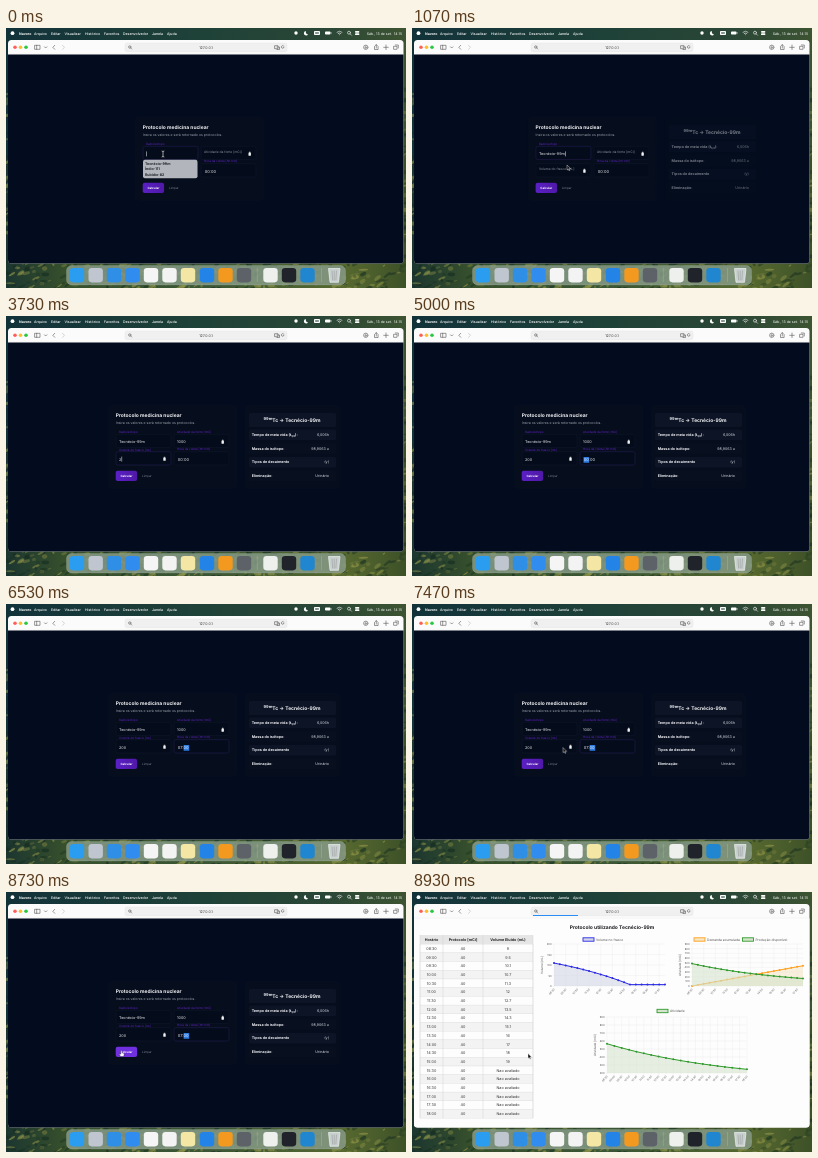
An HTML page that plays this animation: 400 by 260 pixels, repeating every 9 s.

```html
<!DOCTYPE html>
<html lang="pt-BR">
<head>
<meta charset="utf-8">
<title>Protocolo medicina nuclear</title>
<style>
  html, body { margin: 0; width: 100%; height: 100%; overflow: hidden; background: #22392a; }
  svg { display: block; width: 100vw; height: 100vh; }
  text { font-family: Inter, "Noto Sans", sans-serif; font-size: 3.75px; text-rendering: geometricPrecision; white-space: pre; }
  .b { font-weight: 700; }
  .float { font-size: 3px; fill: #5f25c4; }
  .hint { font-size: 3.3px; fill: #8b91a0; }
  .box { fill: #040b1a; stroke: #111a2f; stroke-width: .5; }
  .box.on { stroke: #28215a; }
  .glyph { fill: none; stroke: #555; stroke-width: .6; stroke-linecap: round; stroke-linejoin: round; }
  .tick { font-size: 2.7px; fill: #555; }
</style>
</head>
<body>
<svg id="stage" viewBox="0 0 400 260" preserveAspectRatio="none">
  <defs>
    <linearGradient id="sky">
      <stop offset="0" stop-color="#12323a"/><stop offset=".5" stop-color="#1f4238"/>
      <stop offset=".8" stop-color="#2a4636"/><stop offset="1" stop-color="#3d5432"/>
    </linearGradient>
    <linearGradient id="hills">
      <stop offset="0" stop-color="#1c3630"/><stop offset=".15" stop-color="#37502c"/>
      <stop offset=".5" stop-color="#3a5634"/><stop offset=".85" stop-color="#56682f"/><stop offset="1" stop-color="#3d5128"/>
    </linearGradient>
    <linearGradient id="violet">
      <stop offset="0" stop-color="#5a20c4"/><stop offset="1" stop-color="#5018a8"/>
    </linearGradient>
  </defs>
  <rect width="400" height="130" fill="url(#sky)"/>
  <rect y="130" width="400" height="130" fill="url(#hills)"/>
  <g id="foliage"></g>
  <g id="menu" fill="#fff"></g>
  <rect x="2" y="12" width="395.5" height="223.5" rx="3.5" fill="#fbfbfb"/>
  <g id="toolbar"></g>
  <g id="form">
    <path d="M2 26.5H397.5V232a3.5 3.5 0 0 1-3.5 3.5H5.5a3.5 3.5 0 0 1-3.5-3.5Z" fill="#020c1e"/>
    <g id="panel"></g>
    <g id="card"></g>
  </g>
  <g id="report"></g>
  <g id="dock"></g>
  <g id="mouse">
    <path id="beam" d="M-1.3-3Q0-3 0-2V2Q0 3-1.3 3M1.3-3Q0-3 0-2M0 2Q0 3 1.3 3" fill="none" stroke="#e4e0d5" stroke-width=".7"/>
    <path id="arrow" d="M0 0V5L1.2 4L2 5.8L2.9 5.4L2.1 3.7H3.7Z" fill="#111" stroke="#fff" stroke-width=".4"/>
    <path id="hand" d="M-.6-2.2Q0-2.9.6-2.2V-.1L2.4.4Q3 .7 2.8 1.6L2.3 3.6H-.9L-2.2 1.3Q-2.1.5-1.3.8L-.6 1.3Z" fill="#fff" stroke="#111" stroke-width=".4"/>
  </g>
</svg>
<script>
const LOOP = 9000, PICK_AT = 930, REPORT_AT = 8740;
const $ = id => document.getElementById(id);
const text = (x, y, s, attrs = '') => `<text x="${x}" y="${y}" ${attrs}>${s}</text>`;
const rect = (x, y, w, h, attrs = '') => `<rect x="${x}" y="${y}" width="${w}" height="${h}" ${attrs}/>`;
const glyph = (d, attrs = '') => `<path class="glyph" d="${d}" ${attrs}/>`;
const mid = 'text-anchor="middle"', end = 'text-anchor="end"';

// Wallpaper foliage along the visible lower strip and the side edges
let seed = 41;
const rand = () => (seed = seed * 16807 % 2147483647) / 2147483647;
const leaf = (x, y) => `<ellipse cx="${x}" cy="${y}" rx="${1 + rand() * 4}" ry="${.6 + rand() * 1.6}" transform="rotate(${rand() * 50 - 40} ${x} ${y})" fill="${rand() < .45 ? '#92964a' : '#152c20'}" fill-opacity="${.25 + rand() * .4}"/>`;
$('foliage').innerHTML = Array.from({ length: 260 }, () => leaf(rand() * 400, 235 + rand() * 26)).join('')
  + Array.from({ length: 50 }, (_, i) => leaf(i % 2 ? 399 : 1, 60 + rand() * 175)).join('');

// Desktop chrome
const menuItems = [[28, 'Arquivo'], [45, 'Editar'], [58.5, 'Visualizar'], [79, 'Histórico'], [98, 'Favoritos'],
  [117, 'Desenvolvedor'], [146, 'Janela'], [161, 'Ajuda']];
const white = 'style="stroke:#fff"';
$('menu').innerHTML = '<circle cx="6.5" cy="5.2" r="1.9"/>'
  + text(13, 6.5, 'Navoro', 'class="b" style="font-size:3.5px"')
  + menuItems.map(([x, s]) => text(x, 6.5, s, 'style="font-size:3.5px;font-weight:500"')).join('')
  + '<circle cx="290" cy="5" r="1.7"/><path d="M300 3a2.2 2.2 0 1 0 2 3.2A2.2 2.2 0 0 1 300 3Z"/>'
  + rect(308, 3, 6, 4, 'rx=".8"') + text(311, 6.2, 'BR', `${mid} class="b" style="font-size:2.8px" fill="#24473a"`)
  + rect(319, 3.4, 5.5, 3.2, 'rx=".8"') + rect(325, 4.4, .5, 1.2)
  + glyph('M331 4.2Q333.5 2 336 4.2M332.2 5.5Q333.5 4.4 334.8 5.5M333.5 6.7h0', white)
  + glyph('M344.5 4.7a1.5 1.5 0 1 0-3 0a1.5 1.5 0 1 0 3 0M344.1 5.8L345.5 7.2', white)
  + rect(349, 3, 4.4, 1.7, 'rx=".85"') + rect(349, 5.3, 4.4, 1.7, 'rx=".85"')
  + text(396, 6.5, 'Sáb., 13 de set.  14:15', `${end} style="font-size:3.5px"`);

$('toolbar').innerHTML = ['#ff5f57', '#febc2e', '#28c840']
  .map((c, i) => `<circle cx="${9 + i * 5.5}" cy="19.3" r="1.75" fill="${c}"/>`).join('')
  + rect(119, 15, 162, 8.7, 'rx="2" fill="#f0f0f0" stroke="#ddd" stroke-width=".3"')
  + text(200, 20.7, '127.0.0.1', `${mid} style="font-size:3.6px" fill="#333"`)
  + glyph('M29 17.3h5v4h-5ZM30.7 17.3v4M38.5 18.8l1.2 1.2l1.2-1.2M48.8 17.3l-2 2l2 2M125 19a1.2 1.2 0 1 0-2.4 0a1.2 1.2 0 1 0 2.4 0M124.7 20l1 1')
  + glyph('M56.5 17.3l2 2l-2 2', 'opacity=".4"')
  + glyph('M269 17.7h3v3h-3ZM271 19h2.5v2.5h-2.5M278 19a1.3 1.3 0 1 1-.6-1.2')
  + glyph('M362 19.3a2.2 2.2 0 1 0-4.4 0a2.2 2.2 0 1 0 4.4 0M359.8 18v2.3l-.8-.8M359.8 20.3l.8-.8M368.5 18.5v3h3.6v-3M370.3 20v-3.4l-1 1M370.3 16.6l1 1M380 17v4.6M377.7 19.3h4.6M388 18.3h3v3h-3ZM389.3 17h3v3')
  + '<path d="M2 26.3H397.5" stroke="#ddd" stroke-width=".4"/>'
  + rect(121, 23.1, 45, .9, 'id="progress" fill="#1682f5"');

const icons = [[71, '#2b9df0'], [89.7, '#bfc6cf'], [108, '#2f8ee5'], [126.5, '#318cf0'], [145, '#f5f5f5'], [163.5, '#f3f3f3'],
  [182, '#f4e7a6'], [201, '#2383e6'], [219.5, '#f3991f'], [238, '#5d6268'], [264.5, '#eef0ee'], [283, '#20242a'], [301.5, '#2086d0']];
$('dock').innerHTML = rect(60.5, 237.5, 279, 19.5, 'rx="5" fill="#869a87" fill-opacity=".85" stroke="#cbd6c9" stroke-opacity=".4" stroke-width=".4"')
  + icons.map(([x, c]) => rect(x - 7.2, 240, 14.4, 14.4, `rx="3.3" fill="${c}"`)).join('')
  + '<path d="M251.3 240v14M315.5 240v14" stroke="#fff" stroke-opacity=".35" stroke-width=".4"/>'
  + '<path d="M322.5 240.5h11.5l-1.5 13.8h-8.5Z" fill="#c9d0cf" stroke="#eef1ef" stroke-width=".7"/>'
  + glyph('M326 243l.6 9M328.2 243v9M330.5 243l-.6 9', 'style="stroke:#959e9b"');

// Form, laid out at its final position
const pad = (x, y) => rect(x - 1.2, y - 1.5, 2.4, 3.3, 'rx=".5" fill="#f2f2f4"') + rect(x - .7, y - 2.2, 1.4, .8, 'fill="#f2f2f4"');
const field = (id, x, y) => rect(x, y, 55, 13.3, `id="${id}" class="box" rx="1.8"`);
$('panel').innerHTML = rect(102.5, 89, 128, 83.5, 'rx="3" fill="#060d1c" stroke="#091224" stroke-width=".4"')
  + text(109.7, 101.4, 'Protocolo medicina nuclear', 'class="b" style="font-size:4.95px" fill="#f5f5f8"')
  + text(109.7, 107.8, 'Insira os valores e será retornado os protocolos.', 'style="font-size:3.5px" fill="#9aa0ae"')
  + field('isoBox', 110, 118.3) + field('actBox', 168, 118.3) + field('volBox', 110, 135.7) + field('timeBox', 168, 135.7)
  + text(113, 117.2, 'Radioisótopo', 'class="float"')
  + text(171, 134.4, 'Hora da coleta [hh:mm]', 'class="float"')
  + text(0, 0, 'Atividade da fonte [mCi]', 'id="actLabel"') + text(0, 0, 'Volume do frasco [mL]', 'id="volLabel"')
  + pad(216.7, 126) + pad(158.5, 143)
  + rect(0, 141, 5.6, 5.7, 'id="select" rx=".5" fill="#2f7be0"')
  + '<g fill="#f1f1f5">' + text(113, 127.4, '', 'id="iso"') + text(171, 127.4, '', 'id="act"')
  + text(113, 144.6, '', 'id="vol"') + text(171.8, 145.2, '', 'id="time" style="font-size:4px"') + '</g>'
  + rect(0, 0, .5, 5, 'id="caret" fill="#f5f5ff"')
  + rect(109.7, 154.8, 21.4, 10.2, 'id="button" rx="2"')
  + text(120.4, 161, 'Calcular', `${mid} class="b" style="font-size:2.95px" fill="#fff"`)
  + text(136, 161, 'Limpar', 'style="font-size:3px" fill="#7e8595"')
  + '<g id="options">' + rect(110, 131.8, 54.5, 18.5, 'rx="2" fill="#b3b5bd"')
  + ['Tecnécio-99m', 'Índio-111', 'Rubídio-82'].map((s, i) => text(112, 136.8 + i * 5.4, s, 'style="font-size:3.6px;font-weight:600" fill="#101218"')).join('') + '</g>';

const facts = [['Tempo de meia vida (t<tspan dy="1" font-size="2.7">1/2</tspan><tspan dy="-1">):</tspan>', '6,006h'],
  ['Massa do isótopo:', '98,9063 u'], ['Tipos de decaimento', '(γ)'], ['Eliminação:', 'Urinário']];
$('card').innerHTML = rect(239.5, 89.5, 94, 83, 'rx="3" fill="#060d1d" stroke="#091224" stroke-width=".4"')
  + rect(243, 97, 87, 14, 'rx="1.5" fill="#0c1425"')
  + text(286, 106, '<tspan dy="-1.6" font-size="4">99m</tspan><tspan dy="1.6">Tc → Tecnécio-99m</tspan>', `${mid} class="b" style="font-size:4.95px" fill="#f5f5f8"`)
  + facts.map(([name, value], i) => {
    const y = 119.8 + i * 13.7;
    return rect(243, y - 6.3, 87, 10.5, `rx="1.5" fill="${i % 2 ? '#080f1f' : '#0c1425'}"`)
      + text(245.7, y, name, 'class="b" style="font-size:3.7px" fill="#f0f0f4"')
      + text(323, y, value, `${end} style="font-size:3.65px" fill="#dcdfe6"`);
  }).join('');

// Report
const ROWS = 20, SERVED = 14, DOSE = 40;
const rows = [...Array(ROWS).keys()];
const clock = i => `${String(8 + (i + 1 >> 1)).padStart(2, '0')}:${i % 2 ? '00' : '30'}`;
const eluted = i => 9 * 2 ** (i / 12);
const activity = i => 840 * 2 ** (-i / 12);
const remaining = i => rows.slice(0, Math.min(i + 1, SERVED)).reduce((v, k) => v - eluted(k), 200);
const demand = i => DOSE * i;

const series = [];
function chart({ x, w, top, base, min, max, step, axis, every, legend, lines }) {
  const py = v => base - (v - min) / (max - min) * (base - top);
  const px = i => x + i * w / (ROWS - 1);
  let out = '';
  for (let v = min; v <= max; v += step)
    out += `<path d="M${x - 1.5} ${py(v)}H${x + w}" stroke="#e4e4e4" stroke-width=".3"/>` + text(x - 2.3, py(v) + 1, v, `${end} class="tick"`);
  rows.filter(i => i % every === 0).forEach(i => {
    out += `<path d="M${px(i)} ${top}V${base + 1.5}" stroke="#e8e8e8" stroke-width=".3"/>`
      + text(0, 0, clock(i), `${end} class="tick" transform="translate(${px(i) + 1} ${base + 3.5}) rotate(-48)"`);
  });
  out += text(0, 0, axis, `${mid} transform="translate(${x - 11.5} ${(top + base) / 2}) rotate(-90)" style="font-size:3px" fill="#555"`);
  lines.forEach(({ color, fill, value }, k) => {
    const id = `s${series.length}`;
    series.push({ id, base, x, w, points: rows.map(i => [px(i), py(value(i))]) });
    out += `<path id="${id}a" fill="${fill}" fill-opacity=".6"/><path id="${id}l" fill="none" stroke="${color}" stroke-width="1"/>`
      + `<path id="${id}d" stroke="${color}" stroke-width="2" stroke-linecap="round"/>`;
    const [lx, ly, name] = legend[k];
    out += rect(lx, ly - 1.7, 11, 3.4, `fill="${fill}" stroke="${color}" stroke-width=".9"`) + text(lx + 13, ly + 1.2, name, 'style="font-size:3.3px" fill="#555"');
  });
  return out;
}

const cols = [8, 31, 71, 121], colMid = [19.5, 51, 96];
const rowY = i => 52.2 + i * 8.7;
const cells = (values, y, attrs) => values.map((s, k) => text(colMid[k], y, s, `${mid} ${attrs}`)).join('');
const green = { color: '#2f9a2b', fill: '#d5e4cd', value: activity };
$('report').innerHTML = '<path d="M2 26.5H397.5V232a3.5 3.5 0 0 1-3.5 3.5H5.5a3.5 3.5 0 0 1-3.5-3.5Z" fill="#fdfdfd"/>'
  + text(200, 37.2, 'Protocolo utilizando Tecnécio-99m', `${mid} class="b" style="font-size:4.95px" fill="#1b1b1f"`)
  + rect(8, 43, 113, 9.2, 'fill="#e6e6e6"')
  + cells(['Horário', 'Protocolo [mCi]', 'Volume Eluído (mL)'], 49, 'class="b" fill="#222"')
  + rows.map(i => rect(8, rowY(i), 113, 8.7, `fill="${i % 2 ? '#f3f3f3' : '#fdfdfd'}" stroke="#d6d6d6" stroke-width=".3"`)
    + cells([clock(i), DOSE, i < SERVED ? +eluted(i).toFixed(i > 12 ? 0 : 1) : 'Nao avaliado'], rowY(i) + 5.6, 'fill="#333"')).join('')
  + cols.map(x => `<path d="M${x} 43V${rowY(ROWS)}" stroke="#ccc" stroke-width=".4"/>`).join('')
  + chart({ x: 142, w: 111, top: 52, base: 94, min: 0, max: 200, step: 50, axis: 'Volume [mL]', every: 2,
    legend: [[171, 47.5, 'Volume no frasco']], lines: [{ color: '#2929e6', fill: '#d3d6e6', value: remaining }] })
  + chart({ x: 280, w: 111, top: 52, base: 94, min: 0, max: 900, step: 100, axis: 'Atividade [mCi]', every: 2,
    legend: [[282, 47.5, 'Demanda acumulada'], [330.5, 47.5, 'Produção disponível']],
    lines: [{ color: '#ff9f1a', fill: '#f5e6c6', value: demand }, green] })
  + chart({ x: 195, w: 140, top: 125, base: 181, min: 200, max: 900, step: 100, axis: 'Atividade [mCi]', every: 1,
    legend: [[245, 119, 'Atividade']], lines: [green] });

function drawSeries(grow) {
  for (const { id, base, x, w, points } of series) {
    const p = points.map(([a, b]) => `${a.toFixed(2)} ${(base + (b - base) * grow).toFixed(2)}`);
    $(id + 'l').setAttribute('d', 'M' + p.join('L'));
    $(id + 'a').setAttribute('d', `M${x} ${base}L${p.join('L')}L${x + w} ${base}Z`);
    $(id + 'd').setAttribute('d', p.map(q => `M${q}h0`).join(''));
  }
}

// Timeline
const clamp = v => Math.min(1, Math.max(0, v));
const smooth = v => v * v * (3 - 2 * v);
const easeOut = (v, power) => 1 - (1 - clamp(v)) ** power;
const at = (t, steps) => steps.reduce((value, [time, next]) => t >= time ? next : value, '');
const path = [[0, 157, 126], [250, 157, 126], [750, 155, 136], [1130, 155, 137], [1850, 180, 129], [2070, 180, 130],
  [7100, 180, 130], [7900, 115, 160.5], [8600, 115, 160.5], [8900, 116, 161.5]];
function mouseAt(t) {
  const next = path.findIndex(([time]) => time > t);
  if (next < 0) return path.at(-1).slice(1);
  const [t0, x0, y0] = path[next - 1], [t1, x1, y1] = path[next];
  const p = smooth((t - t0) / (t1 - t0));
  return [x0 + (x1 - x0) * p, y0 + (y1 - y0) * p];
}
const show = (id, on) => $(id).setAttribute('visibility', on ? 'inherit' : 'hidden');
function label(id, x, row, floated) {
  const el = $(id);
  el.setAttribute('class', floated ? 'float' : 'hint');
  el.setAttribute('x', x);
  el.setAttribute('y', row + (floated ? -1.2 : 6.2));
}

function render(t) {
  const slide = easeOut((t - PICK_AT) / 500, 2), report = t >= REPORT_AT;
  const shift = `translate(${27 * (1 - slide)} 0)`;
  $('panel').setAttribute('transform', shift);
  $('card').setAttribute('transform', shift);
  $('card').setAttribute('opacity', slide);
  show('form', !report);
  show('report', report);
  show('progress', report);
  show('options', t < PICK_AT);

  const focus = at(t, [[0, 'iso'], [1930, 'act'], [3330, 'vol'], [4600, 'time']]);
  for (const name of ['iso', 'act', 'vol', 'time'])
    $(name + 'Box').setAttribute('class', focus === name ? 'box on' : 'box');
  const values = {
    iso: t < PICK_AT ? '' : 'Tecnécio-99m',
    act: at(t, [[2470, '1'], [2670, '10'], [2800, '100'], [2930, '1000']]),
    vol: at(t, [[3660, '2'], [3930, '20'], [4070, '200']]),
    time: t < 5470 ? '00:00' : '07:00'
  };
  for (const name in values) if ($(name).textContent !== values[name]) $(name).textContent = values[name];
  label('actLabel', 171, 118.3, t >= 1930);
  label('volLabel', 113, 135.7, t >= 3330);

  const onTime = focus === 'time';
  show('select', onTime && !report);
  $('select').setAttribute('x', t < 5530 ? 171.5 : 177.6);
  show('caret', !onTime && !report);
  if (!onTime) {
    const el = $(focus);
    const width = values[focus] ? el.getComputedTextLength() + .3 : 0;
    $('caret').setAttribute('x', +el.getAttribute('x') + width);
    $('caret').setAttribute('y', el.getAttribute('y') - 4);
  }

  const [mx, my] = mouseAt(t);
  const typing = t >= 2470 && t < 7100;
  const hover = t >= 7100 && mx < 131;
  const overText = t < 500 || (t >= 1500 && t < 2470);
  $('button').setAttribute('fill', hover ? '#7130e0' : 'url(#violet)');
  $('mouse').setAttribute('transform', `translate(${mx.toFixed(2)} ${my.toFixed(2)})`);
  show('mouse', !typing);
  show('beam', overText);
  show('hand', hover && !report);
  show('arrow', !overText && (!hover || report));
  if (report) drawSeries(easeOut((t - REPORT_AT) / 1000, 4));
}

const start = performance.now();
function tick() {
  render((performance.now() - start) % LOOP);
  requestAnimationFrame(tick);
}
tick();
</script>
</body>
</html>
```
